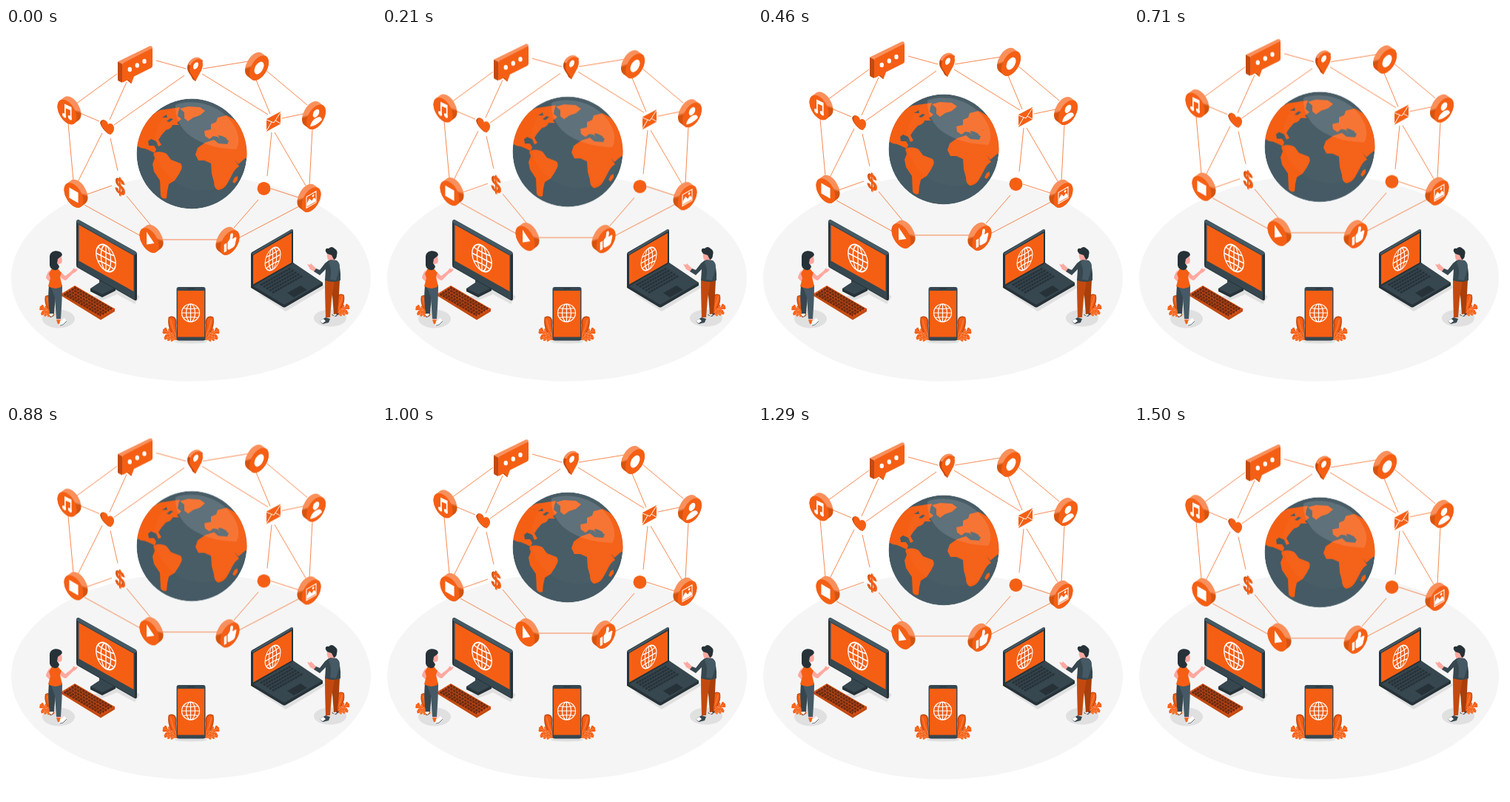
An HTML page without scripts for the animation above (1.54 s loop, 500 px wide and 500 px high).

```html
<!DOCTYPE html>
<html lang="en">
<head>
<meta charset="utf-8">
<title>Connected world</title>
<style>
  html, body { margin: 0; width: 100%; height: 100%; overflow: hidden; background: #fff; }
  svg { display: block; width: 100%; height: 100%; }
  .float { animation: float 1540ms linear infinite; }
  @keyframes float {
    0% { transform: translateY(0); }
    47.5% { transform: translateY(-9.6px); }
    97.5% { transform: translateY(.7px); }
    100% { transform: translateY(.2px); }
  }
  .o { fill: #f55f14; }
  .deep { fill: #c24a10; }
  .lit { fill: #f9905c; }
  .w { fill: #fff; }
  .ink { fill: #263238; }
  .slate { fill: #37474f; }
  .steel { fill: #455a64; }
  .skin { fill: #ffa8a0; }
  .shade { fill: #e0e0e0; }
  .line { fill: none; stroke: #fff; stroke-width: 1.2; }
  .links { fill: none; stroke: #f55f14; stroke-width: .75; }
</style>
</head>
<body>
<svg viewBox="0 0 500 500">
  <defs>
    <linearGradient id="rim" gradientUnits="userSpaceOnUse" x1="0" y1="-23" x2="8" y2="8">
      <stop offset=".5" stop-color="#f9905c"/>
      <stop offset=".6" stop-color="#d4540f"/>
    </linearGradient>
    <clipPath id="ball"><circle cx="251" cy="170" r="74.500"/></clipPath>
    <g id="coin">
      <path d="M0 0l7-8" stroke="url(#rim)" stroke-width="30" stroke-linecap="round"/>
      <circle class="o" r="15"/>
    </g>
    <g id="coinR" transform="scale(-1 1)"><use href="#coin"/></g>
    <g id="web" class="line">
      <circle r="12"/>
      <ellipse rx="6" ry="12"/>
      <path d="M0-12V12M-12 0H12M-10-6.500Q0-4.500 10-6.500M-10 6.500Q0 4.500 10 6.500"/>
    </g>
    <!-- fern built from round-ended strokes -->
    <g id="fern" fill="none" stroke-linecap="round">
      <path d="M0 0V-24M0-7l-5-3M0-7l5-3M0-13l-5-4M0-13l5-4M0-19l-3-4M0-19l3-4" stroke="#f55f14" stroke-width="4"/>
      <path d="M0 0V-23M0-7l-4-3M0-7l4-3M0-13l-4-4M0-13l4-4" stroke="#fbb089" stroke-width=".5"/>
    </g>
    <g id="bush">
      <path class="deep" d="M0 0C-11-8-14-20-12-28C-4-32 1-26-1-18Q0-8 0 0Z"/>
      <path class="o" d="M0-2C-9-10-12-20-11-27C-5-30-1-25-3-18Z"/>
      <path d="M0-2Q-7-14-9-25" fill="none" stroke="#fbb089" stroke-width=".5"/>
      <use href="#fern" transform="translate(0 -1) rotate(-60) scale(.85 .88)"/>
      <use href="#fern" transform="rotate(-82) scale(.5 .72)"/>
    </g>
  </defs>

  <ellipse cx="250" cy="338" rx="243" ry="139.500" fill="#f5f5f5"/>

  <g class="float">
    <path class="links" d="M203 44L243 55M266 55L328 45M94 103L150 62M100 115L126 126M163 73L140 124M146 131L241 64M265 62L354 117M337 68L357 116M351 57L407 104M373 122L402 116M414 136L410 213M84 129L91 206M130 142L97 208M141 149L151 193M109 225L143 213M106 239L182 281M163 227L196 267M211 286H285M341 232L308 270M358 217L395 229M359 141L353 200M363 141L405 213M396 241L314 284"/>

    <g clip-path="url(#ball)">
      <circle class="steel" cx="251" cy="170" r="74.500"/>
      <g class="o">
        <path d="M170 155L182 125L208 111L222 109L235 107L233 113L232 119L237 123L231 128L234 131L225 131Q224 136 216 138L210 145L206 151L210 158L206 160L203 153L196 150L192 153L193 159L200 159L203 164L201 169L195 166L188 163L182 162Z"/>
        <path d="M199 170C204 166 211 167 217 170L223 178L236 183C240 189 236 192 234 197L228 206L220 211L218 220L217 230Q212 232 209 227L208 206L200 194L198 184L201 176Z"/>
        <path d="M235 109L246 106L262 107L269 112L262 118L253 121L246 126L241 122L241 114Z"/>
        <path d="M269 146L268 139L277 137L277 130L284 127L286 121L298 118L309 124L330 148L330 173L322 177L314 184L309 178L315 187C308 191 307 196 303 203L298 212Q293 219 286 219Q281 216 281 208L278 197L277 183L268 179L260 179L256 171L259 162L269 155L281 151L287 156L299 157L301 152L294 150L289 151L286 147L280 146L275 150Z"/>
        <path d="M306 208L309 202L313 200L313 205L309 210Z"/>
      </g>
      <path class="steel" d="M211 121l6-4 1 4zM222 122l4 1-5 4-4-1zM287 145l5 1 6 3 1 4-6-1-5-2z"/>
      <ellipse cx="266" cy="156" rx="65" ry="63" fill="#fff" opacity=".02"/>
      <path d="M229 104C227 138 258 162 311 164C320 150 310 124 286 110C266 99 244 98 229 104Z" fill="#fff" opacity=".12"/>
    </g>

    <!-- speech bubble -->
    <path class="lit" d="M151 45.500L194 24.500Q198 23 198 28L157 49Z"/>
    <path class="deep" d="M151 45.500L157 48.500V74L152 71.500Q151 71 151 69ZM163 70l2-1 5 5-1 1z"/>
    <path class="o" d="M157 50Q157 48 159 47L196 28Q198 27 198 29V51Q198 53 196 54L173 65.500L169.500 75L165.500 69.500L159 73Q157 74 157 72Z"/>
    <g class="w"><ellipse cx="167.300" cy="56" rx="2.700" ry="3.200"/><ellipse cx="177.300" cy="50.500" rx="2.700" ry="3.200"/><ellipse cx="187" cy="45" rx="2.700" ry="3.200"/></g>

    <!-- map pin -->
    <path class="deep" d="M245 54C245 45 253 39 260 40L266 44L256 72L252 69C250 63 245 60 245 54Z"/>
    <path class="lit" d="M246 49C249 42 256 38 261 40L265 43L250 51Z"/>
    <path class="o" d="M248 56C248 47 256 41 261 42C269 44 266 55 262 61L256 72C254 65 248 62 248 56Z"/>
    <ellipse class="w" cx="256.500" cy="51" rx="3" ry="5" transform="rotate(28 256.500 51)"/>

    <!-- heart -->
    <path class="deep" d="M127 128Q128 124 132 124L136 127L142 144L138 143Q129 136 127 128Z"/>
    <path class="o" d="M129 129C129 122 136 123 138 130C141 127 147 131 146 137Q145 142 141 144Q130 138 129 129Z"/>

    <!-- envelope -->
    <path class="o" d="M352 123L371 113V129.500L352 140Z"/>
    <path class="line" style="stroke-width:1" d="M352 124L362 128L371 114M352 139L359 127M371 129L364 125"/>

    <!-- dollar -->
    <g transform="matrix(.74 .37 0 1 154.500 225)" font-family="'Liberation Sans', Arial, sans-serif" font-size="31" font-weight="700" text-anchor="middle">
      <text class="deep" x="-1.300">$</text><text class="o" x=".5">$</text>
    </g>

    <circle class="o" cx="348.500" cy="217" r="9"/>

    <!-- coins -->
    <g transform="matrix(.866 .5 0 1 82.500 113.500)">
      <use href="#coin"/>
      <path class="w" d="M-4-9L7-10V5H5V-5L-2-4V7H-4Z"/>
      <ellipse class="w" cx="-4.500" cy="7" rx="3" ry="2.700"/><ellipse class="w" cx="4.500" cy="5.500" rx="3" ry="2.700"/>
    </g>
    <g transform="matrix(.866 .5 0 1 91.500 226)">
      <use href="#coin"/><rect class="w" x="-7" y="-7" width="14" height="14"/>
    </g>
    <g transform="matrix(.866 .5 0 1 193.500 287)">
      <use href="#coin"/><path class="w" d="M-4-9.500L8 0L-4 7.500Z"/>
    </g>
    <g transform="matrix(.866 -.5 0 1 342 54)">
      <use href="#coinR"/><circle class="w" r="7.500"/>
    </g>
    <g transform="matrix(.866 -.5 0 1 419 120.300)">
      <use href="#coinR"/><circle class="w" cy="-5" r="5"/><path class="w" d="M-9 8.500C-9-1 9-1 9 8.500Q0 12 -9 8.500Z"/>
    </g>
    <g transform="matrix(.866 -.5 0 1 412.500 232)">
      <use href="#coinR"/><rect class="line" x="-7.500" y="-7.500" width="15" height="15"/>
      <path class="w" d="M-7 6V2L-3-3L1 2L4-1L7 3V6Z"/><circle class="w" cx="3" cy="-4" r="1.600"/>
    </g>
    <g transform="matrix(.866 -.5 0 1 302.500 290)">
      <use href="#coinR"/>
      <path class="w" d="M-9-2H-5V9H-9ZM-3.500-2L0-5L1-11Q5-12 5-7L4-3H9Q11-2 10 0L8 7Q7 9 5 9H-1L-3.500 7.500Z"/>
    </g>
  </g>

  <!-- desktop computer -->
  <path class="shade" d="M118 363L160 349L181 363L174 373L150 360L130 368Z"/>
  <path class="ink" d="M114 352V356L130 364L148 355V351Z"/>
  <path class="slate" d="M114 352L126 344V335L141 343V348L148 351L130 360Z"/>
  <path class="ink" d="M95 262Q95 259 98 259L175 302Q177 303 177 306V365Q177 369 174 368L97 324Q95 323 95 320Z"/>
  <path class="steel" d="M95 262Q96 259 98 259L175 302L177 305L173 307L97 264Z"/>
  <path class="slate" d="M97 264L174 307V367L97 323Z"/>
  <path class="o" d="M98.500 266L172.500 307.500V356L98.500 314.500Z"/>
  <use href="#web" transform="matrix(1.100 .58 0 1.420 135 311)"/>

  <!-- desktop keyboard -->
  <path class="deep" d="M75 359V362L128 394.500L147 383V379Z"/>
  <path fill="#d9521a" d="M75 359L93 348L147 379.500L128 391Z"/>
  <g fill="none" stroke="#6f2c10" stroke-width="3.200" stroke-dasharray="3.600 .7">
    <path d="M92 350.500L143 380M88.500 352.700L139.500 382M85 355L136 384.500M81.500 357.200L132.500 386.700M78.500 359.300L128.500 388.500"/>
  </g>

  <!-- laptop -->
  <path class="shade" d="M340 359L378 383L431 351L428 345L380 366Z"/>
  <path class="ink" d="M331 347V351L374 377Q376 378 378 377L428 348V344Z"/>
  <path class="slate" d="M331 347L388 317L428 344L376 374Z"/>
  <g fill="none" stroke="#263238" stroke-width="2.800" stroke-dasharray="3.200 .7">
    <path d="M344 347.500L385 324.500M348 350L389 327M352 352.600L393 329.600M356 355.200L397 332M360 357.800L401 334.600"/>
  </g>
  <path class="ink" d="M380 358L398 348L407 354L389 364Z"/>
  <path class="ink" d="M331 306Q331 303 334 302L385 272.500Q388 271 388 274V318L333 349.500Q331 350 331 347Z"/>
  <path class="steel" d="M331 305L386 272L388 274L334 306Z"/>
  <path class="o" d="M334 307L386 277V317L334 346.500Z"/>
  <use href="#web" transform="matrix(.87 -.5 0 1.200 360.500 312)"/>

  <!-- phone -->
  <ellipse class="shade" cx="250" cy="424" rx="22" ry="2.500"/>
  <use href="#bush" transform="translate(231 421) scale(.95 1.080)"/>
  <use href="#bush" transform="translate(269 421) scale(-.95 1.080)"/>
  <rect class="slate" x="230.500" y="350" width="39" height="72.500" rx="3"/>
  <rect class="o" x="232" y="355" width="36" height="62.500"/>
  <path class="ink" d="M245 352h10v1h-10z"/>
  <use href="#web" x="249.500" y="385"/>

  <!-- woman -->
  <ellipse class="shade" cx="71" cy="393" rx="22" ry="12.500"/>
  <use href="#bush" transform="translate(64 388) scale(.92)"/>
  <path class="skin" d="M59 327Q54 334 54 338L62 346L64 341L60 337ZM73 329L80 335L88 329L92 324L93 326L97 325L95 329L90 332L81 341Q77 341 72 335ZM60 380h5v7h-5zM69 390h5v6h-5z"/>
  <path class="o" d="M59 387L65 385V389L60 391ZM68 394L74 395L76 399L70 400Z"/>
  <path class="w" d="M58 388l3-4 3 2-2 4zM73 396l6-4 3 4-5 5-5 1z"/>
  <path d="M58 388l2 3 4-2M73 402l4-1 5-5" fill="none" stroke="#455a64" stroke-width=".8"/>
  <path class="slate" d="M58 347L68 350L65 386H59Q56 369 58 347Z"/>
  <path class="steel" d="M60 348L76 347Q76 366 74 393H68L66 364Z"/>
  <path class="o" d="M61 326L70 325L75 331L73 336L76 349Q67 355 57 349L60 338L58 332Z"/>
  <path class="skin" d="M66 307L74 307Q77 313 75 318L71 319L70 326L65 325Z"/>
  <path class="ink" d="M59 309C59 301 70 299 75 304Q77 307 74 309L70 312L69 318L72 322Q71 328 65 327Q58 325 59 317Z"/>

  <!-- man -->
  <ellipse class="shade" cx="438" cy="392" rx="22" ry="11.500"/>
  <use href="#bush" transform="translate(446 387) scale(-.9 .94)"/>
  <path class="slate" d="M440 388L446 383L450 386L446 390ZM424 396L432 391L438 393L436 398L428 400Z"/>
  <path class="w" d="M424 396l5-3 3 3-4 3zM441 387l4-2 2 3-3 1z"/>
  <path fill="#a83f0c" d="M438 341L451 341Q450 365 448 386L443 387L441 362Z"/>
  <path class="deep" d="M431 339L444 342L440 366L438 391L432 391Q431 362 431 339Z"/>
  <path class="skin" d="M407 319L411 320L412 318L415 321L420 326L418 330L411 326ZM434 304L445 304L445 317L437 315Q433 312 434 304Z"/>
  <path class="slate" d="M436 314L447 315Q453 322 452 341Q443 345 431 341L432 326L424 334L416 329L419 325L424 327L431 318Z"/>
  <path class="steel" d="M438 313L447 314Q453 319 450 327L446 341L438 340Q441 325 436 317Z"/>
  <path class="ink" d="M432 302Q431 297 436 298Q440 294 444 298Q449 301 447 307Q447 312 443 313L440 307L434 305Z"/>
</svg>
</body>
</html>
```
